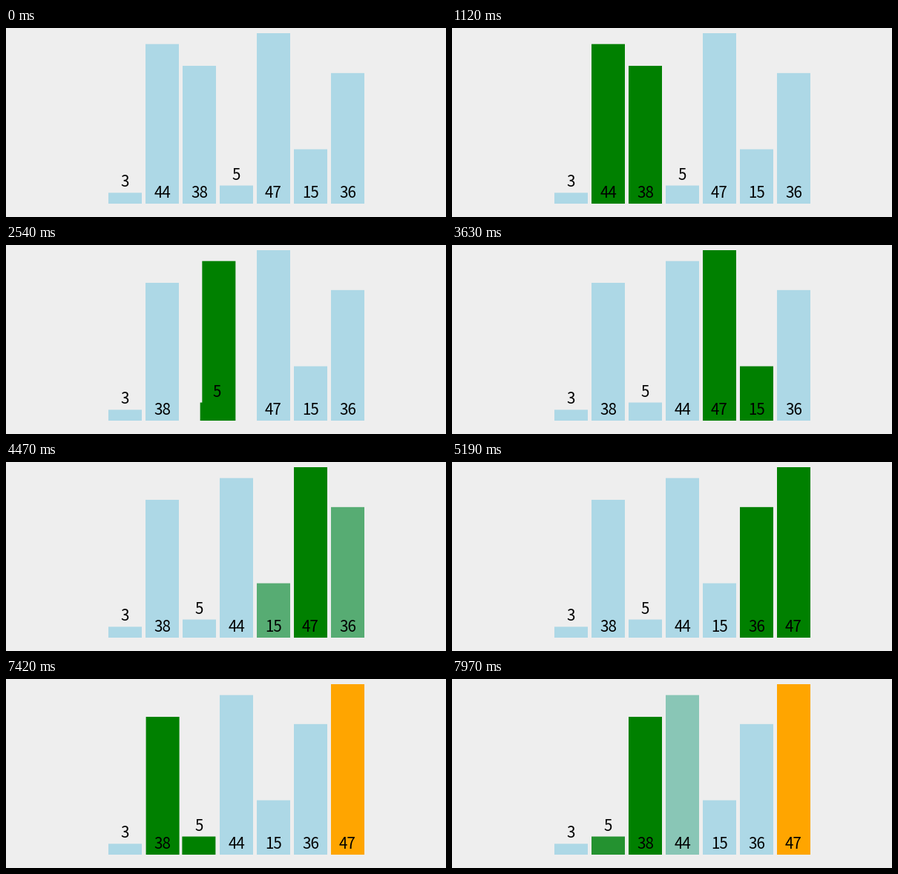
A matplotlib script that plays this animation: 593x255 px, repeating every 8000 ms.

```python
import matplotlib.pyplot as plt
import numpy as np
from matplotlib.animation import FuncAnimation
from matplotlib.colors import to_rgb
from matplotlib.patches import Rectangle

W, H, DPI = 593, 255, 64
LOOP, STEP = 8000, 20
VALUES = [3, 44, 38, 5, 47, 15, 36]
LEFT, PITCH, BAR_W, BASE, MAX_H = 138, 50, 45, 237, 230
IDLE, ACTIVE, SORTED = (np.array(to_rgb(c)) for c in ("lightblue", "green", "orange"))
FONT_PX = 20.6
TWEEN = 220

# first and last visible step (ms), action, slot
EVENTS = [
    (500, 650, "compare", 0),
    (970, 1120, "compare", 1), (1440, 1670, "swap", 1),
    (1990, 2140, "compare", 2), (2460, 2690, "swap", 2),
    (2990, 3160, "compare", 3),
    (3540, 3630, "compare", 4), (3950, 4170, "swap", 4),
    (4470, 4550, "compare", 5), (4980, 5190, "swap", 5),
    (5490, 5630, "settle", 6),
    (6490, 6580, "compare", 0),
    (6960, 7110, "compare", 1), (7420, 7650, "swap", 1),
    (7970, 8120, "compare", 2),
]


def cubic_in_out(u):
    u = min(max(u, 0), 1)
    return 4 * u ** 3 if u < 0.5 else 1 - 4 * (1 - u) ** 3


def progress(t, first, last):
    """Eased progress, held between the coarse steps of one transition."""
    if t < first:
        return 0
    if t >= last:
        return 1
    count = round((last - first) / 75)
    ticks = np.round(np.linspace(first, last, count + 1), -1)
    tick = ticks[ticks <= t][-1]
    middle = first + {1: 0, 2: 28, 3: 78}[count]
    return cubic_in_out(0.5 + (tick - middle) / TWEEN)


def pose(t):
    """Left edge and colour of every bar at time t."""
    slots = list(range(len(VALUES)))
    xs = [LEFT + PITCH * i for i in slots]
    colors = [IDLE] * len(VALUES)
    settled = set()
    for first, last, action, i in EVENTS:
        p = progress(t, first, last)
        if p == 0:
            break
        if action == "swap":
            a, b = slots[i], slots[i + 1]
            xs[a] += PITCH * p
            xs[b] -= PITCH * p
            slots[i], slots[i + 1] = b, a
            continue
        if action == "settle":
            settled.add(slots[i])
            active = []
        else:
            active = slots[i:i + 2]
        for bar, color in enumerate(colors):
            goal = SORTED if bar in settled else ACTIVE if bar in active else IDLE
            colors[bar] = color + (goal - color) * p
    return xs, colors


plt.rcParams["toolbar"] = "None"
fig = plt.figure(figsize=(W / DPI, H / DPI), dpi=DPI, facecolor="#eeeeee")
ax = fig.add_axes([0, 0, 1, 1])
ax.set(xlim=(0, W), ylim=(H, 0))
ax.axis("off")

bars = []
for k, value in enumerate(VALUES):
    height = value * MAX_H / max(VALUES)
    rect = Rectangle((0, BASE - height), BAR_W, height, lw=0, snap=False, zorder=2 * k + 1)
    ax.add_patch(rect)
    label_y = (BASE - height if height < 30 else BASE) - 8
    label = ax.text(0, label_y, str(value), ha="center", va="baseline", color="black",
                    family="Noto Sans CJK JP", size=FONT_PX * 72 / DPI, zorder=2 * k + 2)
    bars.append((rect, label))


def update(i):
    xs, colors = pose(i * STEP + STEP / 2)
    for (rect, label), x, color in zip(bars, xs, colors):
        rect.set_x(x)
        rect.set_facecolor(color)
        label.set_x(x + BAR_W / 2)
    return [artist for pair in bars for artist in pair]


anim = FuncAnimation(fig, update, frames=LOOP // STEP, interval=STEP,
                     repeat=True, repeat_delay=0, blit=False)
plt.show()
```
